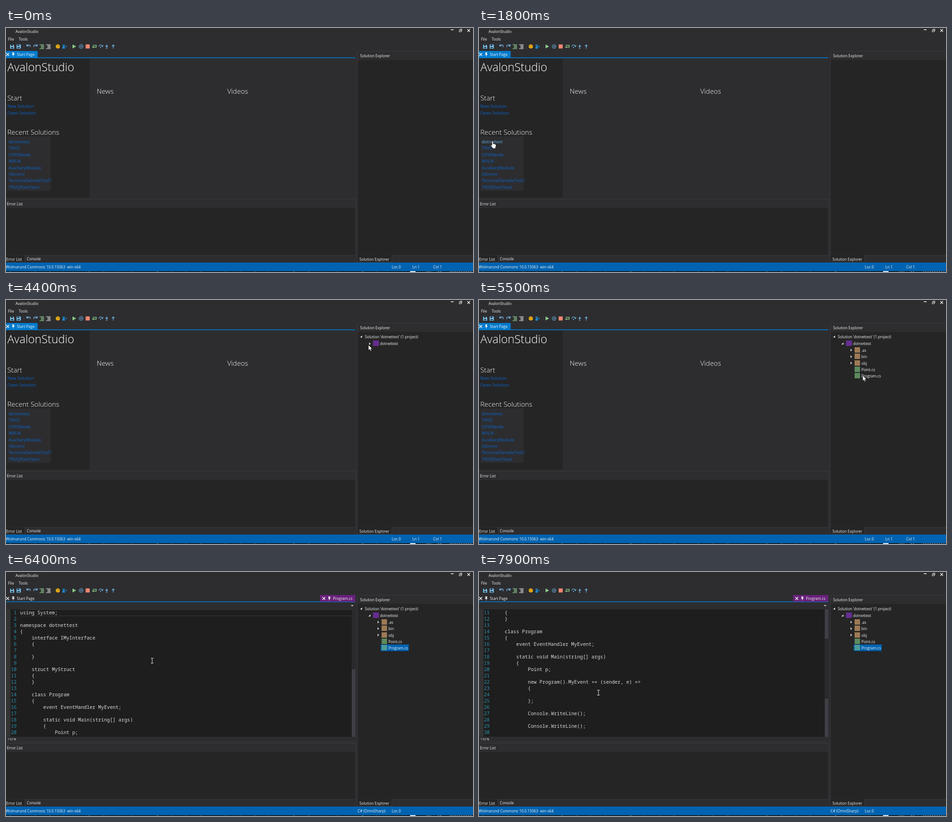
Recreate the animation shown at these times as an HTML page. Size 1032 by 542 pixels, loop 8000 ms.

```html
<!DOCTYPE html>
<html lang="en">
<head>
<meta charset="utf-8">
<title>AvalonStudio</title>
<style>
  html, body { margin: 0; width: 100%; height: 100%; overflow: hidden; background: #2d2d30; }
  svg { display: block; width: 1032px; height: 542px; }
  text { font: 8.25px "Open Sans", "Noto Sans", sans-serif; fill: #f4f4f4; white-space: pre; }
  .title { font-size: 25.2px; font-weight: 300; fill: #fff; }
  .head { font-size: 15.3px; font-weight: 350; fill: #fff; }
  .link { font-size: 9.5px; fill: #0a66cc; }
  .code { font: 10.67px "Noto Sans Mono", "DejaVu Sans Mono", monospace; fill: #dcdcdc; }
  .num { fill: #2b91af; text-anchor: end; }
  .zoom { font-size: 7px; }
</style>
</head>
<body>
<svg id="stage" viewBox="0 0 1032 542" xmlns="http://www.w3.org/2000/svg"></svg>
<script>
const BG = '#2d2d30', PANEL = '#252526', EDGE = '#3f3f46', BLUE = '#007acc', DEEP = '#0063b1';
const LINE = 14, CHAR = 6.42, LOOP = 8000;

const rect = (x, y, w, h, fill) => `<rect x="${x}" y="${y}" width="${w}" height="${h}" fill="${fill}"/>`;
const text = (x, y, s, cls = '') => `<text x="${x}" y="${y}" class="${cls}">${s}</text>`;
const line = (d, color, w = 1, dash = 'none') =>
  `<path d="${d}" fill="none" stroke="${color}" stroke-width="${w}" stroke-dasharray="${dash}"/>`;
const shape = (d, fill) => `<path d="${d}" fill="${fill}"/>`;
const group = (id, body) => `<g id="${id}">${body}</g>`;

function titleBar() {
  const sky = '#75bfee', green = '#8cc987', gray = '#d4d4d4', rule = '#3a3a3e';
  const floppy = x => shape(`M${x} 37h7l2 2v7h-9z`, sky) + rect(x + 2, 37, 4, 3, BG) + rect(x + 2, 42.5, 5, 2.5, BG);
  const bars = (x, c) => [0, 1, 2, 3, 4]
    .map(i => rect(x + (i % 4 ? 3 : 0), 36.5 + i * 2.2, i % 4 ? 7 : 10, 1.2, c)).join('');
  return text(21, 11, 'AvalonStudio') + text(4.5, 28, 'File') + text(28, 28, 'Tools') +
    rect(983, 3, 6, 1.6, '#fff') +
    line('M1003.5 4.5v-2h4v4h-2M1001.5 4.5h4v4h-4z', '#f1f1f1') +
    line('M1019.5 2.5l6 6m0-6l-6 6', '#fff', 1.3) +
    floppy(9) + rect(25, 36, 8, 8, '#4d87ab') + floppy(23.5) +
    line('M46 36v4h4M46.5 39.5c3-4 8-2 7 3', sky, 1.3) +
    line('M69 36v4h-4M68.5 39.5c-3-4-8-2-7 3', sky, 1.3) +
    bars(74, green) + bars(88.5, gray) +
    shape('M114.5 36l4.5 2.3v5.4l-4.5 2.3l-4.5-2.3v-5.4z', '#e0a818') +
    line('M110.5 38.6l4 2l4-2', '#9c7410', .7) +
    shape('M125 37h5v2h-5zM125 40h5v6h-5z', '#1e88cf') + line('M131 41h4m-2-2v4', '#1e88cf', 1.2) +
    [39, 104, 141].map(x => rect(x, 36, 1, 10, rule)).join('') +
    shape('M147 36.5l8 4.5l-8 4.5z', green) +
    `<circle cx="166" cy="41" r="4.3" fill="none" stroke="${sky}"/>` + line('M164.8 39v4m2.5-4v4', sky, 1.1) +
    rect(176, 36.5, 9, 9, '#f48771') +
    line('M193 42.5h6.5v-4h-8', green, 1.5) + shape('M190 42.5l3.5-2.5v5z', green) +
    line('M205.5 41c1-4.5 6-4.5 7-1', sky, 1.2) + shape('M214.5 37.5v4h-4z', sky) + rect(208, 42, 2, 2, sky) +
    line('M222.5 36.5v6m-2.5-3l2.5 3l2.5-3', sky, 1.2) + rect(221.5, 44, 2, 2, sky) +
    line('M237 45.5v-8m-2.8 3l2.8-3l2.8 3', sky, 1.2);
}

const tabIcons = x => line(`M${x} 55.5l6.5 6.5m0-6.5l-6.5 6.5`, '#fff', 1.3) +
  shape(`M${x + 13} 54.5h5v1h-1v3h1.5v1h-2.5v3.5h-1v-3.5h-2.5v-1h1.5v-3h-1z`, '#fff');

const dots = (x, y, w) => line(`M${x} ${y - 1.5}h${w}M${x + 1} ${y + .5}h${w}`, '#333338', 1, '1 2');

function frameParts() {
  return rect(0, 65.3, 772, 1.7, BLUE) +
    rect(0, 380, 772, 125, PANEL) + rect(0, 381, 772, 19, BG) +
    line('M0 380.5h772.5v124.5H0', EDGE, .8) +
    text(2, 394, 'Error List') + dots(42, 391, 724) +
    rect(0, 505, 41, 14.5, PANEL) + line('M41.5 505v14.5H0', EDGE, .8) +
    text(.5, 516.5, 'Error List') + text(46, 516, 'Console') +
    rect(776, 51, 256, 454, PANEL) + rect(777, 52, 255, 19, BG) +
    line('M1032 51.5H776.5v453.5H1032', EDGE, .8) +
    text(782.5, 64.5, 'Solution Explorer') + dots(852, 62, 176) +
    rect(777, 504.5, 75, 15, PANEL) + line('M776.5 505v14.5h76v-14.5', EDGE, .8) +
    text(781, 516.5, 'Solution Explorer') +
    rect(0, 521, 1032, 19, DEEP) +
    text(-.5, 533.5, 'Wolmarund Commons 10.0.15063  win-x64') + text(852.5, 533.5, 'Loc 0') +
    group('caret', text(898, 533.5, 'Ln 1') + text(944, 533.5, 'Col 1')) +
    group('lang', text(777, 533.5, 'C# (OmniSharp)'));
}

function taskbar() {
  let marks = '';
  for (let i = 0; i < 22; i++) {
    marks += rect(8 + i * 38 + (i * 17) % 23, 541, 2 + i % 3, 1, i % 4 ? '#3f5866' : '#2f93a8');
  }
  return rect(0, 540, 1032, 2, '#14242e') + marks + rect(893, 540, 12, 2, '#e8eef2') +
    line('M929 541.5h11m14 0h9m18 0h50', '#9fb0ba', .9, '3 2');
}

function startPage() {
  const recent = ['dotnettest', 'TRVQ', 'OPZKNode', 'WXLN', 'AuxiliaryModule', 'Glimmo',
    'TerminalSampleTool1', 'TRVQFlashStart'];
  return rect(0, 51, 70, 15, BLUE) +
    rect(0, 68, 185, 309, PANEL) + rect(3, 241, 95.5, 121, BG) +
    text(3, 96, 'AvalonStudio', 'title') + text(3, 161, 'Start', 'head') +
    text(3, 177, 'New Solution', 'link') + text(3, 191.5, 'Open Solution', 'link') +
    text(3, 237, 'Recent Solutions', 'head') +
    text(200.5, 146, 'News', 'head') + text(489, 146, 'Videos', 'head') +
    recent.map((s, i) => text(6, 256 + i * 14.4, s, 'link')).join('');
}

function editor() {
  const code = `using System;

namespace dotnettest
{
    interface IMyInterface
    {

    }

    struct MyStruct
    {
    }

    class Program
    {
        event EventHandler MyEvent;

        static void Main(string[] args)
        {
            Point p;

            new Program().MyEvent += (sender, e) =&gt;
            {

            };

            Console.WriteLine();

            Console.WriteLine();
`.split('\n');
  const rows = code.map((s, i) => {
    const y = 93.7 + i * LINE, indent = s.length - s.trimStart().length;
    return text(23.5, y, i + 1, 'code num') + text(31 + indent * CHAR, y, s.trim(), 'code');
  }).join('');
  return rect(694, 51, 78, 15, '#68217a') + tabIcons(699) + text(722.5, 62, 'Program.cs') +
    shape('M762 73.5h6l-3 3z', '#d0d0d0') +
    rect(0, 83, 764, 283, '#1e1e1e') + rect(0, 83, 10, 283, '#333333') +
    `<g clip-path="url(#view)">${group('rows', line('M30 83.5h734M30 97.5h734', '#38383a') + rows)}</g>` +
    rect(764, 83, 8, 283, EDGE) + '<rect id="thumb" x="764" width="8" height="133" fill="#2a2a2d"/>' +
    text(3, 374.3, '110 %', 'zoom') + line('M0 377.5h772', '#3a3a3e', .8);
}

const closed = (x, y) => shape(`M${x} ${y - 3}l3.5 3l-3.5 3z`, '#d0d0d0');
const opened = (x, y) => shape(`M${x + 4.5} ${y - 2.3}v4.6h-4.6z`, '#e4e4e4');

function tree() {
  const names = ['.as', 'bin', 'obj', 'Point.cs', 'Program.cs'];
  const items = names.map((name, i) => {
    const y = 111.3 + i * 14.4, id = i === 4 ? 'mark' : 'icon' + i;
    return (i < 3 ? closed(821, y) : '') +
      group(id, rect(830, Math.round(y - 6.5), 12, 12, i < 3 ? '#9c7a55' : '#5b8a5e')) +
      text(845, y + 3.5, name);
  }).join('');
  return opened(782.5, 81) + text(793, 85, "Solution 'dotnettest' (1 project)") +
    rect(811, 90, 13, 12, '#652d90') + text(826.5, 100.3, 'dotnettest') +
    group('shut', closed(802.5, 97)) +
    group('open', opened(801, 96.5) + group('pick', rect(828, 161, 62, 14.5, DEEP)) + items);
}

const pointers =
  group('arrow', '<path d="M0 0v11.5l2.7-2.4l1.9 4.2l2-.9l-1.9-4.1h3.6z" fill="#fff" stroke="#111" stroke-width=".6"/>') +
  group('hand', '<path d="M-1.3 1q1.300-2 2.6 0v5l5 1.2q1.5.5 1.3 2.5l-1 5v2h-6.5v-1.5l-4-4.700q-.6-1.800 1.200-1.700l1.400 1.300z" fill="#fff" stroke="#111" stroke-width=".7"/>') +
  group('beam', line('M-3 -5.5h2.2l.8.6l.8-.6h2.2M-3 5.5h2.2l.8-.6l.8.6h2.2M0 -5v10', '#e4e4e4', 1.1));

const stage = document.getElementById('stage');
stage.innerHTML = '<defs><clipPath id="view"><rect x="0" y="83" width="764" height="283"/></clipPath></defs>' +
  rect(0, 0, 1032, 542, BG) + titleBar() + frameParts() + taskbar() +
  group('start', startPage()) + tabIcons(.5) + text(24, 62, 'Start Page') +
  group('editor', editor()) + group('tree', tree()) + pointers;

const ui = {};
for (const el of stage.querySelectorAll('[id]')) ui[el.id] = el;
const hotLink = [...stage.querySelectorAll('.link')].find(e => e.textContent === 'dotnettest');
const markBox = ui.mark.firstChild;

// Each glide: start, number of 100 ms steps, from x y, to x y, pointer.
const glides = [
  [100, 8, 430, 8, 30, 251, 'arrow'],
  [1800, 6, 30, 251, 394, 214, 'arrow'],
  [3600, 1, 394, 214, 624, 172, 'arrow'],
  [3800, 4, 624, 172, 948, 108, 'arrow'],
  [4200, 3, 948, 108, 801, 100, 'arrow'],
  [5000, 6, 801, 100, 848, 168, 'arrow'],
  [6200, 2, 848, 168, 396, 181, 'beam'],
  [6400, 1, 396, 181, 323, 197, 'beam'],
  [6500, 2, 323, 197, 239, 245, 'beam'],
  [6800, 1, 239, 245, 264, 268, 'beam']
];
// Time and first visible line.
const scrolls = [[0, 0], [7000, 1], [7100, 2], [7200, 4], [7300, 5], [7400, 6], [7700, 7], [7800, 9], [7900, 10]];

const latest = (list, t) => list.filter(e => t >= e[0]).pop();

function pointerAt(t) {
  if (t >= 800 && t < 1900) return { x: 30, y: 251, kind: 'hand' };
  const glide = latest(glides, t);
  if (!glide) return null;
  const [from, steps, x0, y0, x1, y1, kind] = glide;
  const p = Math.min(1, (Math.floor((t - from) / 100) + 1) / steps);
  const k = steps > 2 ? p * p * (3 - 2 * p) : p;
  return { x: x0 + (x1 - x0) * k, y: y0 + (y1 - y0) * k, kind };
}

function draw(t) {
  const show = (id, on) => { ui[id].style.display = on ? '' : 'none'; };
  show('start', t < 5900);
  show('editor', t >= 6400);
  show('tree', t >= 3200);
  show('shut', t < 4700);
  show('open', t >= 4700);
  show('pick', t >= 5900);
  show('caret', t < 6400);
  show('lang', t >= 6400);
  markBox.setAttribute('fill', t >= 5900 ? '#4d9a96' : '#5b8a5e');

  const at = pointerAt(t);
  for (const id of ['arrow', 'hand', 'beam']) show(id, at && at.kind === id);
  if (at) ui[at.kind].setAttribute('transform', `translate(${at.x.toFixed(1)} ${at.y.toFixed(1)})`);
  hotLink.style.fill = at && at.kind === 'hand' ? '#62b4f0' : '';

  const top = latest(scrolls, t)[1];
  ui.rows.setAttribute('transform', `translate(0 ${-top * LINE})`);
  ui.thumb.setAttribute('y', 83 + top * 6.5);
}

function tick() {
  draw(performance.now() % LOOP);
  requestAnimationFrame(tick);
}
tick();
</script>
</body>
</html>
```
